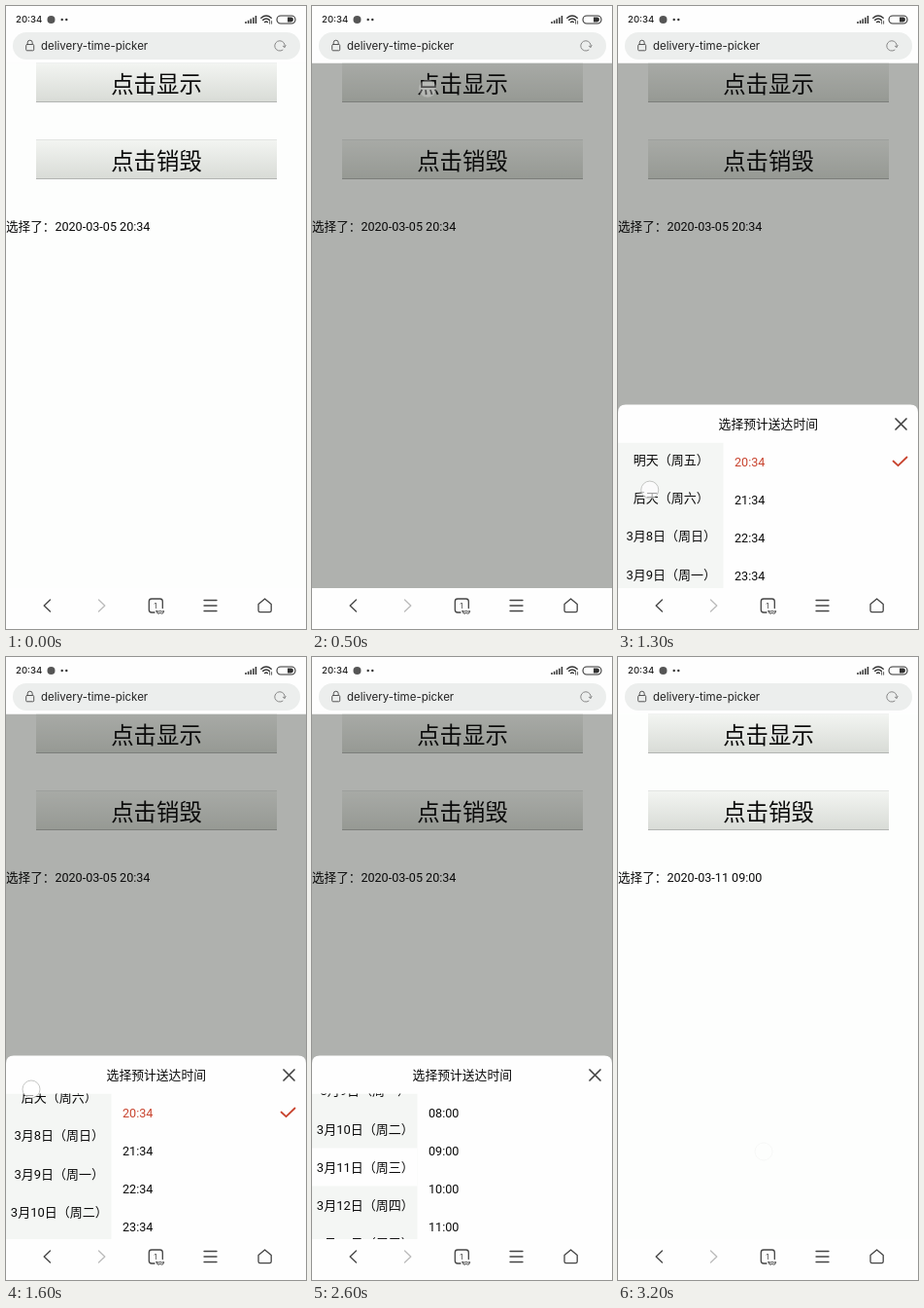
These frames come from a looping animation (309 by 640 pixels, 4500 ms). An HTML page:

```html
<!DOCTYPE html>
<html lang="zh-CN">
<head>
<meta charset="utf-8">
<title>Delivery time picker</title>
<style>
  html, body { margin: 0; width: 100%; height: 100%; overflow: hidden; background: #fdfefd; }
  svg { display: block; width: 309px; height: 640px; }
  text { font: 12.6px Roboto, "Noto Sans CJK SC", "Noto Sans CJK", sans-serif; fill: #0a0a0a; white-space: pre; }
  .mid { text-anchor: middle; }
  .big { font-size: 23.4px; }
  .day { font-size: 13px; }
  .ui { font-family: Inter, sans-serif; fill: #222; }
  .line { fill: none; stroke: #444; stroke-width: 1.3; stroke-linecap: round; stroke-linejoin: round; }
  .red { fill: #c8432e; }
</style>
</head>
<body>
<svg viewBox="0 0 309 640">
  <defs>
    <linearGradient id="face" x2="0" y2="1">
      <stop offset="0" stop-color="#f3f5f2"/>
      <stop offset="1" stop-color="#d8dbd6"/>
    </linearGradient>
    <clipPath id="listBox"><rect y="448.5" width="309" height="151"/></clipPath>
  </defs>

  <rect width="309" height="640" fill="#fdfefd"/>
  <g id="buttons"></g>
  <rect id="dim" y="58.5" width="309" height="539.5" fill="#0a0f08"/>
  <g id="labels"></g>
  <text id="chosen" x="0" y="230.6"></text>

  <g id="sheet">
    <path d="M0 600V417.500q0-8 8-8H301q8 0 8 8V600Z" fill="#fefefe"/>
    <text class="mid" x="154.8" y="433.6" style="font-size:12.8px">选择预计送达时间</text>
    <path class="line" d="M286 424l11 11m0-11l-11 11" style="stroke-width:1.7"/>
    <g clip-path="url(#listBox)">
      <rect y="448.5" width="108.5" height="152" fill="#f4f6f4"/>
      <g id="days"></g>
      <g id="times"></g>
      <path id="check" class="line" d="M283.500 467.500l5 4.700 9-8.700" style="stroke:#c8432e;stroke-width:1.800"/>
    </g>
  </g>
  <circle id="touch" r="9" fill="#fff" fill-opacity=".6" stroke="#aeb0ad" stroke-opacity=".7"/>

  <!-- status bar and address -->
  <rect width="309" height="58.5" fill="#fefefe"/>
  <text class="ui" x="10" y="17.4" style="font-size:9.6px;font-weight:500">20:34</text>
  <circle cx="46.5" cy="14" r="4" fill="#555"/>
  <circle cx="57.7" cy="14" r="1.2" fill="#333"/>
  <circle cx="62.3" cy="14" r="1.2" fill="#333"/>
  <path d="M247 18v-2m2.6 2v-3.3m2.6 3.3v-4.8m2.6 4.8v-6.3m2.6 6.3v-8" stroke="#333" stroke-width="1.5"/>
  <g class="line" style="stroke:#333;stroke-width:1.4">
    <path d="M262.8 12.2q5.2-4.4 10.4 0M264.7 14.4q3.3-2.8 6.6 0M266.6 16.5q1.4-1 2.8 0"/>
    <path d="M271.6 15.6v2.6m2-2.6v2.6" style="stroke-width:.8"/>
    <rect x="279" y="10" width="19" height="8" rx="4" style="stroke-width:1.1"/>
  </g>
  <path d="M290 11.6h3.6a2.4 2.4 0 0 1 0 4.8H290Z" fill="#333"/>
  <rect x="7" y="27" width="296" height="28" rx="14" fill="#eceeed"/>
  <g class="line" style="stroke:#555;stroke-width:1">
    <rect x="20.7" y="39.5" width="8" height="6.3" rx="1"/>
    <path d="M22.2 39.3v-1.6a2.5 2.5 0 0 1 5 0v1.6"/>
    <path d="M285 45.2a5.2 5.2 0 1 1 2-2.8l-1.7-1.2m1.7 1.2l1.1-1.8" style="stroke:#888"/>
  </g>
  <text class="ui" x="36" y="45" style="font-size:11.5px">delivery-time-picker</text>

  <!-- bottom bar -->
  <rect y="598" width="309" height="42" fill="#fefefe"/>
  <g class="line">
    <path d="M45.5 610l-6.3 6 6.3 6"/>
    <path d="M95.5 610l6.3 6-6.3 6" style="stroke:#bbb"/>
    <path d="M153 623h-3q-2.7 0-2.7-2.7v-8.6q0-2.7 2.7-2.7h8.6q2.7 0 2.7 2.7v6.8"/>
    <path d="M155 621.5q2 1.2 3.8 0 2 1.2 3.8 0-.2 2.7-2 2.7-1.3 0-1.8-1.2-.5 1.2-1.8 1.2-1.8 0-2-2.7Z" style="stroke-width:1"/>
    <path d="M204 610.5h13m-13 5.5h13m-13 5.5h13"/>
    <path d="M260 614.5l6.6-5.5 6.6 5.5v6.5q0 1.7-1.7 1.7h-9.8q-1.7 0-1.7-1.7Z"/>
  </g>
  <text class="ui mid" x="154" y="619" style="font-size:8px;fill:#444">1</text>
</svg>

<script>
const LOOP = 4500, STEP = 100, ROW = 39.2, TOP = 468;
const PICK = 2300, CLOSE = 3000;
const $ = id => document.getElementById(id);

function add(parent, tag, attrs, text = '') {
  const el = document.createElementNS('http://www.w3.org/2000/svg', tag);
  for (const key in attrs) el.setAttribute(key, attrs[key]);
  el.textContent = text;
  $(parent).append(el);
  return el;
}

['点击显示', '点击销毁'].forEach((label, i) => {
  const y = 58 + 79 * i;
  const bar = (top, height, fill) =>
    add('buttons', 'rect', { x: 31, y: y + top, width: 248, height, fill });
  bar(0, 41, 'url(#face)');
  bar(0, 1, '#e2e4e2');
  bar(40, 1, '#b2b4b2');
  add('labels', 'text', { class: 'big mid', x: 155, y: y + 30.5 }, label);
});

const names = ['今天', '明天', '后天'];
const activeRow = add('days', 'rect', { width: 108.5, height: ROW, fill: '#fefefe' });
[...'四五六日一二三四五'].forEach((day, i) => {
  const name = names[i] || `3月${5 + i}日`;
  add('days', 'text', { class: 'mid day', x: 54.8, y: TOP + ROW * i + 4.8 }, `${name}（周${day}）`);
});
const hours = [0, 1, 2, 3].map(i =>
  add('times', 'text', { x: 120, y: TOP + ROW * i + 4.6 }));

// Progress from 0 to 1 between two times, and its decelerating form.
const ramp = (t, from, to) => Math.min(1, Math.max(0, (t - from) / (to - from)));
const easeOut = p => 1 - (1 - p) ** 2;

const taps = [
  { time: 400, x: 119, y: 85 },
  { time: 2200, x: 50, y: 525 },
  { time: CLOSE, x: 150, y: 508 },
];

// The finger drags the list, then flicks it and lifts off.
function swipe(t) {
  const drag = ramp(t, 1000, 1600) ** 1.2, flick = easeOut(ramp(t, 1600, 2100));
  return {
    scroll: 94 * drag + 85.2 * flick,
    x: 38 - 12 * drag - 28 * flick,
    y: 538 - 94 * drag - 57 * flick,
    alpha: t < 1000 ? 0 : 1 - ramp(t, 1800, 2100) ** 2,
  };
}

function touchAt(t, finger) {
  const tap = taps.find(({ time }) => t >= time && t < time + 300);
  return tap ? { ...tap, alpha: (1 - (t - tap.time) / 300) ** 2 } : finger;
}

function draw(now) {
  const t = Math.floor(now % LOOP / STEP) * STEP;
  const later = t >= PICK;
  const closing = ramp(t, CLOSE, CLOSE + 200);
  const shown = easeOut(ramp(t, 500, 700)) - closing;
  const finger = swipe(t);
  const { x, y, alpha } = touchAt(t, finger);

  $('sheet').setAttribute('transform', `translate(0 ${190 * (1 - shown)})`);
  $('dim').setAttribute('opacity', .32 * (ramp(t, 400, 500) - closing));
  $('days').setAttribute('transform', `translate(0 ${-finger.scroll})`);
  activeRow.setAttribute('y', TOP - ROW / 2 + (later ? 6 : 0) * ROW);
  hours.forEach((el, i) => {
    el.textContent = later ? `${8 + i}`.padStart(2, '0') + ':00' : `${20 + i}:34`;
    el.setAttribute('class', !later && i === 0 ? 'red' : '');
  });
  $('check').setAttribute('opacity', later ? 0 : 1);
  $('chosen').textContent = '选择了：2020-03-' + (t > CLOSE ? '11 09:00' : '05 20:34');
  $('touch').setAttribute('transform', `translate(${x} ${y})`);
  $('touch').setAttribute('opacity', alpha);
}

const start = performance.now();
function tick() {
  draw(performance.now() - start);
  requestAnimationFrame(tick);
}
tick();
</script>
</body>
</html>
```
